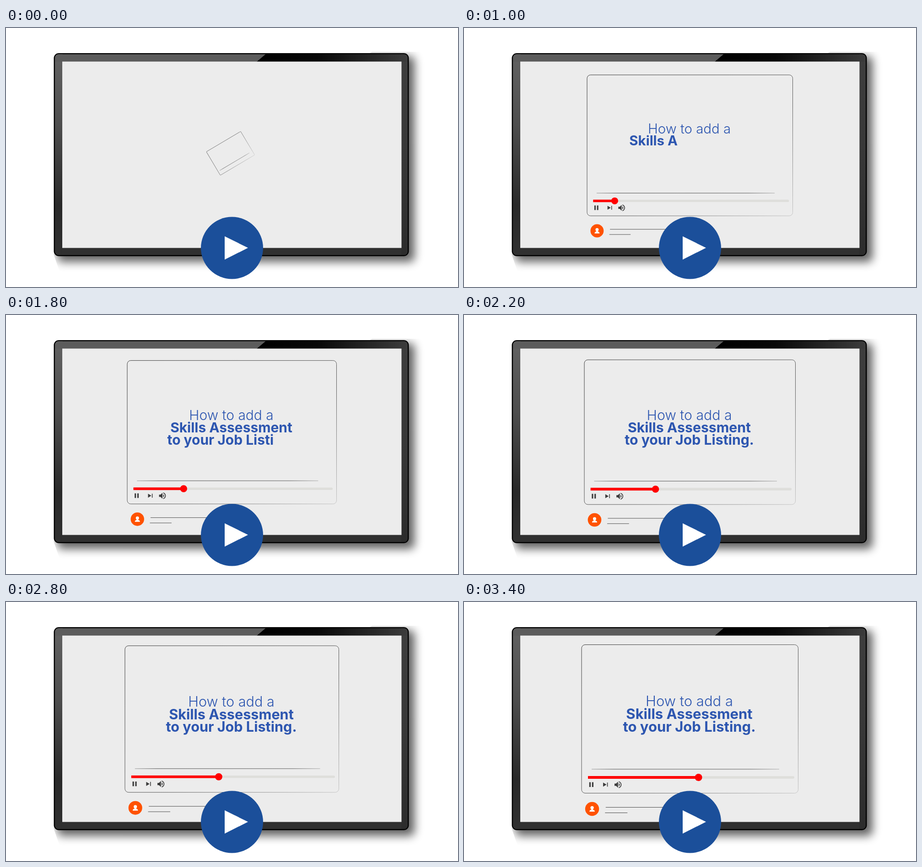
Animation of 988x567 px, one loop 3.5 s. Source, as an HTML page:

```html
<!DOCTYPE html>
<html lang="en">
<head>
<meta charset="utf-8">
<title>Video player on a screen</title>
<style>
  html, body { margin: 0; width: 100%; height: 100%; overflow: hidden; background: #fff; }
  svg { display: block; }
  text { font: 700 31px Inter, sans-serif; fill: #2d56b0; text-anchor: middle; white-space: pre; }
  text.light { font-weight: 300; }
  .rest { fill: none; }
</style>
</head>
<body>
<svg width="988" height="567" viewBox="0 0 988 567">
  <defs>
    <filter id="blur" x="-10%" y="-10%" width="120%" height="120%"><feGaussianBlur stdDeviation="10"/></filter>
    <clipPath id="shadowArea"><path d="M104 495L120 542H921V52H800Z"/></clipPath>
    <clipPath id="bezelArea"><rect x="107" y="57.5" width="771" height="439.5" rx="8"/></clipPath>
    <linearGradient id="side" x2="0" y2="1">
      <stop stop-color="#626262"/><stop offset=".35" stop-color="#4e4e4e"/>
      <stop offset=".75" stop-color="#292929"/><stop offset="1" stop-color="#303030"/>
    </linearGradient>
    <linearGradient id="right" x2="0" y2="1">
      <stop stop-color="#3e3e3e"/><stop offset=".5" stop-color="#383838"/><stop offset="1" stop-color="#2c2c2c"/>
    </linearGradient>
    <linearGradient id="gloss">
      <stop stop-color="#000"/><stop offset=".4" stop-color="#080808"/><stop offset="1" stop-color="#3c3c3c"/>
    </linearGradient>
    <linearGradient id="edge" x2="1" y2="1">
      <stop stop-color="#303030"/><stop offset=".6" stop-color="#555"/><stop offset="1" stop-color="#c4c4c4"/>
    </linearGradient>
    <linearGradient id="taper" gradientUnits="userSpaceOnUse" x1="-215" x2="195">
      <stop stop-color="#999"/><stop offset=".12" stop-color="#444"/>
      <stop offset=".85" stop-color="#555"/><stop offset="1" stop-color="#aaa"/>
    </linearGradient>
  </defs>

  <g clip-path="url(#shadowArea)">
    <rect x="112" y="62" width="781" height="450" rx="10" fill="#000" opacity=".62" filter="url(#blur)"/>
  </g>
  <rect x="104.5" y="55" width="776" height="444.5" rx="11"/>
  <g clip-path="url(#bezelArea)">
    <rect x="107" y="57" width="771" height="441" fill="#303030"/>
    <rect x="107" y="57" width="17" height="441" fill="url(#side)"/>
    <rect x="864" y="57" width="15" height="441" fill="url(#right)"/>
    <path d="M107 57H568L548 74H107Z" fill="#5c5c5c"/>
    <path d="M568 57H878V74H548Z" fill="url(#gloss)"/>
  </g>
  <rect x="123" y="73.5" width="741.5" height="408" fill="#ececec"/>

  <g id="player">
    <g id="lines" fill="none">
      <rect x="-236.75" y="-162.5" width="473.5" height="325" rx="8" stroke="url(#edge)"/>
      <path d="M-214.75 110H195.25" stroke="url(#taper)"/>
    </g>
    <g id="controls">
      <path d="M-184 193.5H-20M-185.5 205.5H-136.5" stroke="#4a4a4a" stroke-width="1"/>
      <path d="M-220 128H225.5" stroke="#dededb" stroke-width="5.5" stroke-linecap="round"/>
      <g fill="#3c3c3c">
        <path d="M-220 138.5h3.2v10.5h-3.2zM-214 138.5h3.2v10.5h-3.2zM-189.7 139.3l7.5 4.5l-7.5 4.5zM-181 139.3h1.6v9h-1.6z"/>
        <path transform="translate(-167.3 133.8) scale(.85)" d="M3 9v6h4l5 5V4L7 9H3zm13.5 3c0-1.77-1.02-3.29-2.5-4.03v8.05c1.48-.73 2.5-2.25 2.5-4.02zM14 3.23v2.06c2.89.86 5 3.54 5 6.71s-2.11 5.85-5 6.71v2.06c4.01-.91 7-4.49 7-8.77s-2.99-7.86-7-8.77z"/>
      </g>
    </g>
    <g id="avatar">
      <circle r="15.2" fill="#ff5200"/>
      <path d="M-1.8-1H1.8V1.6Q5.8 2.6 5.8 6H-5.8Q-5.8 2.6-1.8 1.6Z" fill="#fff"/>
      <circle cy="-2.6" r="3.6" fill="#fff"/>
    </g>
    <path id="played" stroke="#f00" stroke-width="6"/>
    <circle id="knob" cy="128" fill="#f00"/>
    <g id="title"></g>
  </g>

  <circle cx="494" cy="481.5" r="68" fill="#1b4f9a"/>
  <path d="M478 456L529 481.3L478 507Z" fill="#fff"/>
</svg>
<script>
const LOOP = 3500, STEP = 100, START = 0.38;
const $ = id => document.getElementById(id);
const clamp = v => Math.max(0, Math.min(1, v));
const set = (id, attrs) => {
  for (const key in attrs) $(id).setAttribute(key, attrs[key]);
};

const rows = ["How to add a", "Skills Assessment", "to your Job Listing."];
$("title").innerHTML = rows.map((row, i) =>
  `<text x="-1.25" y="${-27.5 + 28 * i}" class="${i ? "" : "light"}"><tspan></tspan><tspan class="rest"></tspan></text>`).join("");

function type(count) {
  rows.forEach((row, i) => {
    const shown = Math.max(0, Math.min(row.length, count));
    const [typed, rest] = $("title").children[i].children;
    typed.textContent = row.slice(0, shown);
    rest.textContent = row.slice(shown);
    count -= row.length + 1;
  });
}

function draw(t) {
  // damped swing of the entrance on top of a slow linear zoom
  const swing = Math.exp(-8 * t) * Math.cos(4.87 * t);
  const zoom = 1 + (t - 3.4) * 10 / 473.5;
  const scale = zoom - 0.744 * swing;
  const x = 493.75 - 3 * swing, y = 257.4 - 0.42 * t + 17 * swing;
  set("player", { transform: `translate(${x} ${y}) rotate(${-30.7 * swing}) scale(${scale})` });
  set("lines", { "stroke-width": 0.95 / scale, opacity: 0.6 + 0.4 * clamp(t / 0.3) });

  const pop = clamp((t - 0.05) / 0.3);
  set("controls", { opacity: pop });
  set("avatar", { transform: `translate(-213.75 197) scale(${pop})` });

  const end = -222.75 + 80 * Math.max(0, t - START);
  set("played", { d: `M-222.75 128H${end}`, opacity: t > 0.45 ? 1 : 0 });
  set("knob", { cx: end, r: 8 * clamp((t - 0.4) / 0.3) });
  type(Math.floor(34 * (t - START)));
}

function tick() {
  const ms = performance.now() % LOOP;
  draw(Math.floor(ms / STEP) * STEP / 1000);
  requestAnimationFrame(tick);
}
tick();
</script>
</body>
</html>
```
